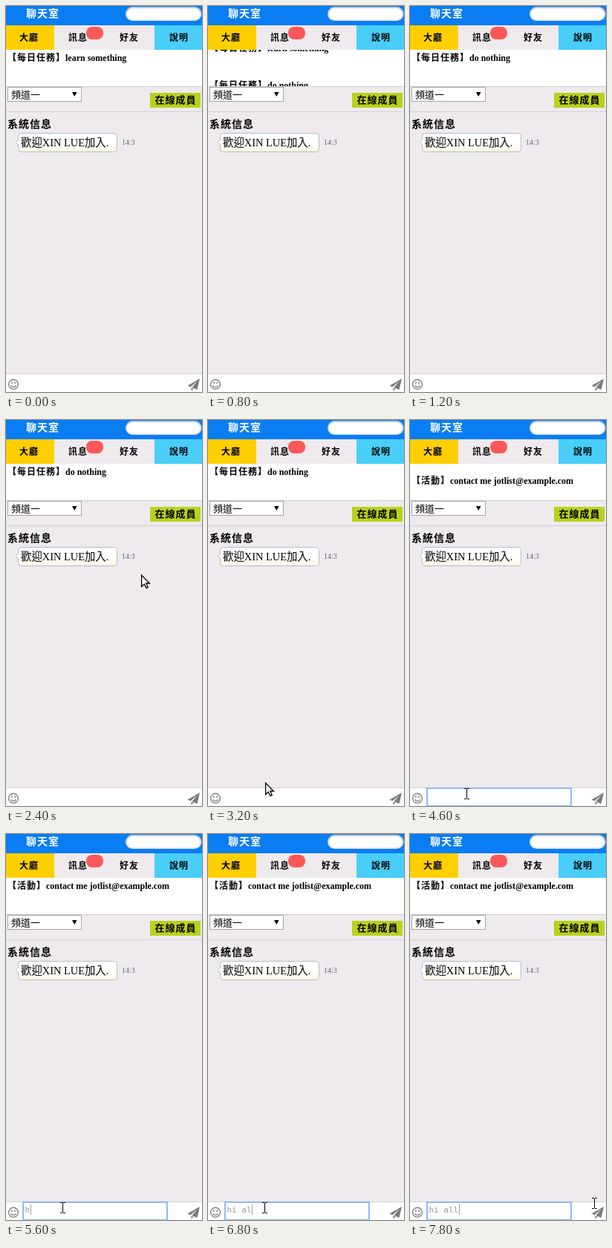
An HTML page for the animation above (8000 ms loop, 264 by 520 pixels).

```html
<!DOCTYPE html>
<html lang="zh-Hant">
<head>
<meta charset="utf-8">
<title>聊天室</title>
<style>
  html, body { margin: 0; width: 264px; height: 520px; overflow: hidden; background: #eeeaed; }
  svg { display: block; }
  text { font-family: "Liberation Serif", "Noto Sans CJK TC", "Noto Sans CJK", serif; white-space: pre; }
  .bold { font-weight: 700; }
  .cjk { font-family: "Noto Sans CJK TC", "Noto Sans CJK", sans-serif; letter-spacing: 1px; }
  .small { font-size: 12px; }
  .large { font-size: 14px; }
  .typed { font: 11px "DejaVu Sans Mono", monospace; fill: #999; }
</style>
</head>
<body>
<svg width="264" height="520" viewBox="0 0 264 520">
  <defs>
    <linearGradient id="bubbleFill" x2="0" y2="1">
      <stop offset="0" stop-color="#fff"/>
      <stop offset=".55" stop-color="#fff"/>
      <stop offset="1" stop-color="#f8f5df"/>
    </linearGradient>
    <linearGradient id="inset" x2="0" y2="1">
      <stop offset=".3" stop-color="#c6c8ce"/>
      <stop offset=".7" stop-color="#e6e6ea"/>
    </linearGradient>
    <clipPath id="newsClip"><rect y="59" width="264" height="49"/></clipPath>
  </defs>

  <rect width="264" height="520" fill="#eeeaed"/>

  <!-- header -->
  <rect width="264" height="26" fill="#0a7df2"/>
  <text class="bold cjk large" x="27" y="14.5" fill="#fff">聊天室</text>
  <rect x="162" y="2" width="100.5" height="17" rx="8.5" fill="#fff" stroke="url(#inset)" stroke-width="2"/>

  <!-- tabs -->
  <rect y="26" width="65" height="33" fill="#ffcf00"/>
  <rect x="200" y="26" width="64" height="33" fill="#48cef8"/>
  <rect x="108" y="28" width="23" height="17" rx="8" fill="#fa5858"/>
  <g class="bold cjk small">
    <text x="18" y="47">大廳</text>
    <text x="84" y="47">訊息</text>
    <text x="153" y="47">好友</text>
    <text x="220" y="47">說明</text>
  </g>

  <!-- news ticker -->
  <rect y="59" width="264" height="49" fill="#fff"/>
  <g id="news" class="bold small" clip-path="url(#newsClip)"></g>
  <path d="M0 108.5H264M0 142.5H264" stroke="#d0cdd0"/>

  <!-- channel bar -->
  <rect x="2.5" y="109.5" width="99" height="19" fill="#fff" stroke="#a3a3a3"/>
  <text x="7" y="123.5" font-size="13">頻道一</text>
  <path d="M89 116h6.5l-3.25 6z"/>
  <rect x="194" y="117" width="68" height="20" fill="#b8d21c"/>
  <text class="bold cjk" x="200.5" y="131" font-size="13">在線成員</text>

  <!-- messages -->
  <text class="bold cjk large" x="2" y="164">系統信息</text>
  <rect x="16.5" y="171.5" width="133" height="25" rx="4" fill="url(#bubbleFill)" stroke="#b4bec8"/>
  <path d="M17.2 179.5L13 183.5L17.2 187.5" fill="#fff" stroke="#b4bec8"/>
  <text x="20" y="189" font-size="14.4">歡迎XIN LUE加入.</text>
  <text x="156" y="187" font-size="10" fill="#5a6a7c">14:3</text>

  <!-- input bar -->
  <rect y="495" width="264" height="25" fill="#fff"/>
  <path d="M0 495.5H264" stroke="#d2d0d2"/>
  <g fill="none" stroke="#808080" stroke-width="1.4">
    <circle cx="10" cy="509.7" r="6.4"/>
    <path d="M6.6 511.2a3.6 3.2 0 0 0 6.8 0"/>
  </g>
  <circle cx="7.8" cy="507.7" r="1.1" fill="#808080"/>
  <circle cx="12.2" cy="507.7" r="1.1" fill="#808080"/>
  <path d="M261 502L244.5 511.5L248.5 513.3L258 505L250.5 514L257.5 517ZM249.5 514.3V518.7L252.5 515.6Z" fill="#7a7a7a"/>

  <g id="focus">
    <rect x="23" y="496" width="194" height="24" fill="#fff" stroke="#8fb9f2" stroke-width="2"/>
    <text id="typed" class="typed" x="25.5" y="510"></text>
    <rect id="caret" y="499" width="1" height="14" fill="#a0a0a0"/>
  </g>

  <!-- pointer -->
  <circle id="click" cx="74" cy="502" r="15" fill="#ff0" fill-opacity=".47"/>
  <path id="arrow" d="M.6 1V16.4L4.3 13L6.9 18.3L9.2 17.3L6.8 12H11.4Z" fill="#fff" stroke="#000" stroke-width="1.3"/>
  <path id="beam" d="M0 1.5H3M4 1.5H7M3.5 2V15M0 15.5H3M4 15.5H7" fill="none" stroke="#000"/>
</svg>

<script>
const LOOP = 8000, TICK = 200, LINE_GAP = 50, CHAR_WIDTH = 6.62;
const MESSAGE = "hi all";
const $ = id => document.getElementById(id);

const NEWS = [
  { label: "【每日任務】", body: "learn something", x: 80 },
  { label: "【每日任務】", body: "do nothing", x: 80 },
  { label: "【活動】", body: "contact me jotlist@example.com", x: 54 }
];
const SLIDES = [800, 4400];
const KEYS = [5600, 6000, 6200, 6600, 6800, 7000];
const BLINKS = [[4400, 4800], [5400, 5600], [7400, 7800]];
const POINTER = [
  [2400, "arrow", 182, 208],
  [2600, "arrow", 70, 188],
  [3000, "arrow", 89, 399],
  [3200, "arrow", 77, 488],
  [3400, "arrow", 76, 498],
  [3600, "arrow", 74, 501],
  [4000, "beam", 73, 495],
  [7600, "beam", 85, 495],
  [7800, "beam", 245, 489]
];

const newsLines = NEWS.map(({ label, body, x }) => {
  const line = document.createElementNS("http://www.w3.org/2000/svg", "g");
  line.innerHTML = `<text class="cjk" x="2" y="74">${label}</text><text x="${x}" y="74">${body}</text>`;
  $("news").append(line);
  return line;
});

const show = (id, on) => $(id).setAttribute("visibility", on ? "visible" : "hidden");
const place = (node, x, y) => node.setAttribute("transform", `translate(${x} ${y})`);
const within = (t, from, to) => t >= from && t < to;

// Swing-eased 600 ms slide, already one tick in when first seen.
function slide(t, start) {
  if (t < start) return 0;
  const p = Math.min(1, (t - start + TICK) / 600);
  return 0.5 - Math.cos(Math.PI * p) / 2;
}

function render(time) {
  // The screen refreshes only once per tick.
  const t = Math.floor((time % LOOP) / TICK) * TICK;

  const scroll = SLIDES.reduce((sum, start) => sum + slide(t, start), 0);
  newsLines.forEach((line, i) => place(line, 0, Math.floor((i - scroll) * LINE_GAP)));

  const focused = t >= 3800;
  const count = KEYS.filter(key => t >= key).length;
  $("typed").textContent = MESSAGE.slice(0, count);
  $("caret").setAttribute("x", Math.round(26 + count * CHAR_WIDTH));
  show("focus", focused);
  show("caret", focused && !BLINKS.some(([from, to]) => within(t, from, to)));

  const pointer = POINTER.filter(([start]) => t >= start).pop();
  for (const id of ["arrow", "beam"]) show(id, pointer && pointer[1] === id);
  if (pointer) place($(pointer[1]), pointer[2], pointer[3]);
  show("click", within(t, 3800, 4000));
}

let begin;
function frame(now) {
  begin ??= now;
  render(now - begin);
  requestAnimationFrame(frame);
}
render(0);
requestAnimationFrame(frame);
</script>
</body>
</html>
```
